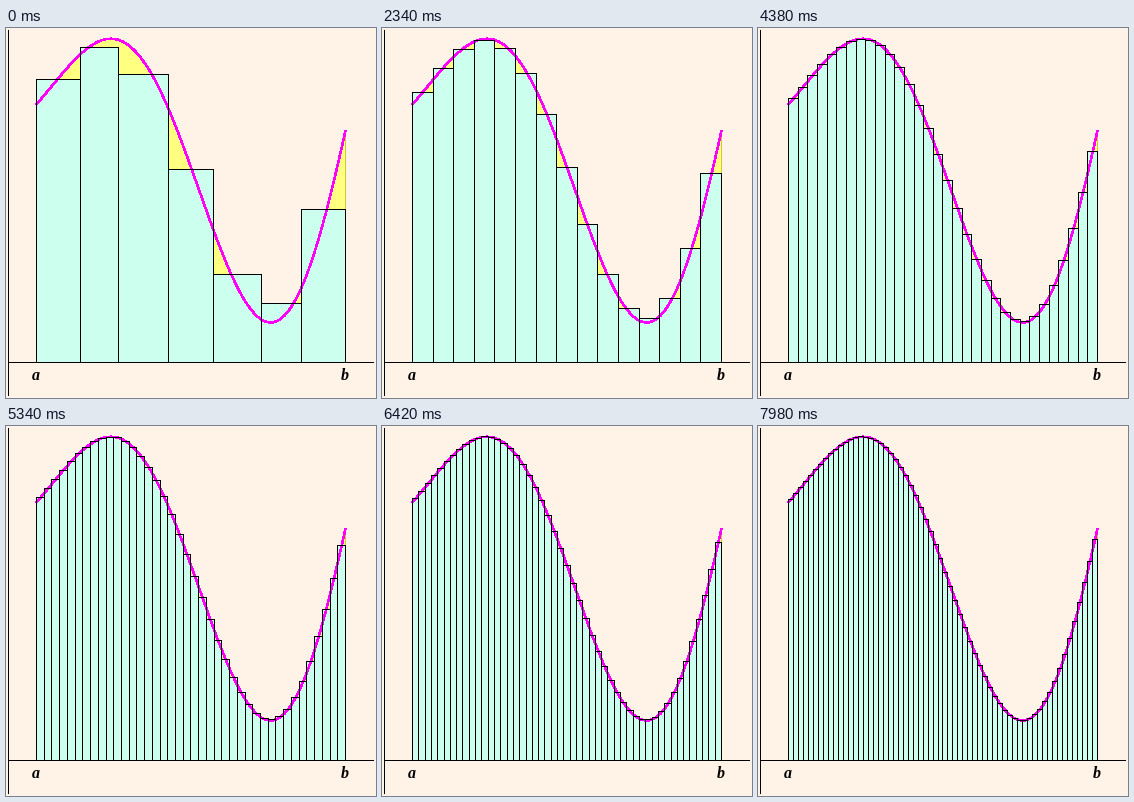
Recreate the animation shown at these times as a matplotlib script. Size 370x370 px, loop 8000 ms.

```python
import numpy as np
import matplotlib.pyplot as plt
from matplotlib.animation import FuncAnimation
from matplotlib.collections import PolyCollection

plt.rcParams["path.snap"] = False  # coordinates are already pixel centres

SIZE, DPI = 370, 100
PX = 72 / DPI                      # one pixel in points
LEFT, RIGHT, BASE = 30, 339, 334
START_BARS = 7
STEP, HOLD, LOOP, TICK = 120, 1500, 8000, 20
PAPER, MINT, YELLOW = "#fff3e8", "#ccffee", "#ffff80"
OLIVE, MAGENTA = "#cccc33", "#ff00ff"

# The curve is one polynomial through a few key points
KEY_X = [30, 48.5, 85.6, 135, 184.5, 234, 283.4, 320.5, 339]
KEY_Y = [76, 53.7, 16.5, 30.2, 138.8, 264.8, 280.4, 180, 102]
curve = np.polynomial.Polynomial.fit(KEY_X, KEY_Y, 7)


def edges_at(ms):
    """Partition of the interval: one more bar every step, uneven at first."""
    count = START_BARS
    if ms >= HOLD:
        count += 1 + (ms - HOLD) // STEP
    edges = np.linspace(LEFT, RIGHT, count + 1)
    if count == START_BARS:
        edges[2] -= 6
        edges[5] += 4
    return edges


def bars_at(ms):
    """Corners of bars whose height is the mean of both end values."""
    edges = edges_at(ms)
    y = curve(edges)
    tops = np.round((y[:-1] + y[1:]) / 2)
    xs = np.round(edges)
    return [[(l, BASE), (l, t), (r, t), (r, BASE)]
            for l, r, t in zip(xs[:-1], xs[1:], tops)]


fig = plt.figure(figsize=(SIZE / DPI, SIZE / DPI), dpi=DPI, facecolor=PAPER)
ax = fig.add_axes([0, 0, 1, 1])
ax.set_xlim(-0.5, SIZE - 0.5)
ax.set_ylim(SIZE - 0.5, -0.5)
ax.axis("off")


def stroke(xs, ys, color, width, z):
    ax.plot(xs, ys, color=color, lw=width * PX, antialiased=False,
            solid_capstyle="butt", zorder=z)


def layer(z, **style):
    polys = PolyCollection([], antialiaseds=False, zorder=z, **style)
    ax.add_collection(polys, autolim=False)
    return polys


x = np.linspace(LEFT, RIGHT, 400)
ax.fill_between(x, curve(x), BASE, color=YELLOW, lw=0,
                antialiased=False, zorder=1)
stroke([RIGHT, RIGHT], [curve(RIGHT), BASE], OLIVE, 1, 1.5)
fills = layer(2, facecolors=MINT, edgecolors="none")
stroke(x, curve(x), MAGENTA, 1.5, 3)
outlines = layer(4, facecolors="none", edgecolors="black", linewidths=PX)

stroke([2, 367.5], [BASE, BASE], "black", 1, 5)
stroke([2, 2], [1.5, 367.5], "black", 1, 5)
for cx, label in ((LEFT - 0.5, "a"), (RIGHT - 1, "b")):
    ax.text(cx, 351.5, label, ha="center", va="baseline", zorder=6,
            family="Liberation Serif", style="italic", weight="bold",
            fontsize=16 * PX)


def draw(frame):
    bars = bars_at(frame * TICK)
    fills.set_verts(bars)
    outlines.set_verts(bars)
    return fills, outlines


anim = FuncAnimation(fig, draw, frames=LOOP // TICK, interval=TICK,
                     init_func=lambda: draw(0), repeat=True, repeat_delay=0)
plt.show()
```
